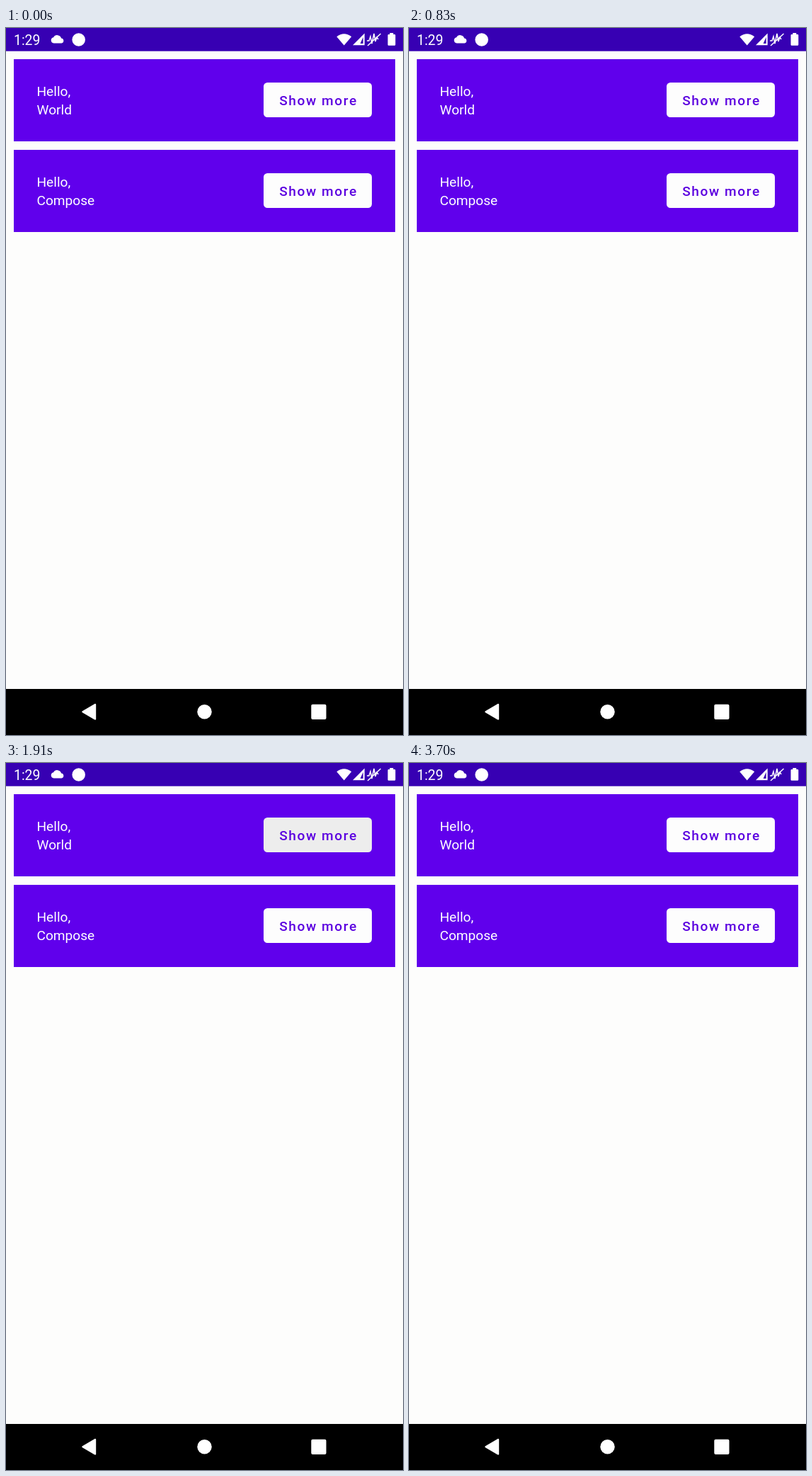
Animation, 561 px wide and 998 px high, one loop 3740 ms. Source, as an HTML page:

```html
<!DOCTYPE html>
<html lang="en">
<head>
<meta charset="utf-8">
<title>Show more, show less</title>
<style>
  @property --open { syntax: "<number>"; inherits: true; initial-value: 0; }

  html, body { margin: 0; width: 100%; height: 100%; overflow: hidden; }
  body { background: #fdfdfc; font: 19.1px/25.6px Roboto, sans-serif; }
  .stage { position: relative; width: 561px; height: 998px; overflow: hidden; }
  .bars { position: absolute; inset: 0; }

  .card {
    position: absolute; left: 11px; width: 539px; height: 116.4px;
    background: #6000ec; color: #fff;
  }
  .card p { position: absolute; left: 32.5px; top: 33.4px; margin: 0; }

  .button {
    position: absolute; right: 32.7px; top: 33px; height: 49.4px;
    width: calc(153.2px - 9.6px * var(--open));
    border-radius: 5.5px; overflow: hidden;
    background: #fdfdfd; color: #5b00e0;
  }
  .label {
    position: absolute; left: 22px; top: 0; white-space: nowrap;
    font-weight: 500; line-height: 51px; letter-spacing: 1.6px;
    transform: translateY(calc(-51px * var(--open)));
  }
  .label span { display: block; }

  .ripple {
    position: absolute; left: 50%; top: 50%; width: 214px; height: 214px;
    margin: -107px; border-radius: 50%; background: rgba(0, 0, 0, .12); opacity: 0;
    animation: fade 3740ms linear infinite, grow 3740ms linear infinite;
    animation-delay: calc(var(--press) - 3740ms);
  }

  .world   { top: 44px;  animation: world 3740ms step-end infinite; }
  .compose { top: 172px; animation: compose 3740ms step-end infinite; }

  @keyframes world   { 0%, 45.86% { --open: 0; } 29.41% { --open: 1; } }
  @keyframes compose { 0%, 77.14% { --open: 0; } 62.43% { --open: 1; } }
  @keyframes fade { 0%, 10%, 100% { opacity: 0; } 2%, 6% { opacity: 1; } }
  @keyframes grow {
    0% { transform: scale(.43); animation-timing-function: cubic-bezier(.4, 0, .2, 1); }
    6%, 100% { transform: scale(1); }
  }
</style>
</head>
<body>
<div class="stage">
  <svg class="bars" width="561" height="998" fill="#fff">
    <rect width="561" height="32.7" fill="#3700b3"/>
    <text x="11" y="24" font-size="19.4" font-family="Roboto, sans-serif">1:29</text>
    <path d="M67.5 21.5a4.2 4.2 0 0 1-.4-8.3a6 6 0 0 1 11 1.2a3.6 3.6 0 0 1 .4 7.1z"/>
    <circle cx="102.7" cy="16.5" r="9.3"/>
    <path d="M467.3 12.3Q477.7 4.3 488.2 12.3L477.7 24.5z"/>
    <path d="M506.7 7.5V24.3H490z"/>
    <path d="M504.6 13v9h-4z" fill="#3700b3"/>
    <path d="M510 18h3l2-6 2 10 3-14 2 11 2-6 2 3M511 25L529.5 8" fill="none" stroke="#fff" stroke-width="1.5"/>
    <path d="M542.3 9V7h5v2h1.7q1.3 0 1.3 1.3v13.2q0 1.3-1.3 1.3h-8.2q-1.3 0-1.3-1.3V10.3q0-1.3 1.3-1.3z"/>
    <rect y="933" width="561" height="65" fill="#000"/>
    <path d="M108.5 965.2L126 955v20.4z" stroke="#fff" stroke-width="2.4" stroke-linejoin="round"/>
    <circle cx="280.5" cy="965.2" r="10.2"/>
    <rect x="431.3" y="954.8" width="21.2" height="21.2" rx="2"/>
  </svg>

  <div class="card world">
    <p>Hello,<br>World</p>
    <div class="button">
      <i class="ripple" style="--press: 1000ms"></i>
      <i class="ripple" style="--press: 1615ms"></i>
      <div class="label"><span>Show more</span><span>Show less</span></div>
    </div>
  </div>

  <div class="card compose">
    <p>Hello,<br>Compose</p>
    <div class="button">
      <i class="ripple" style="--press: 2235ms"></i>
      <i class="ripple" style="--press: 2785ms"></i>
      <div class="label"><span>Show more</span><span>Show less</span></div>
    </div>
  </div>
</div>
</body>
</html>
```
